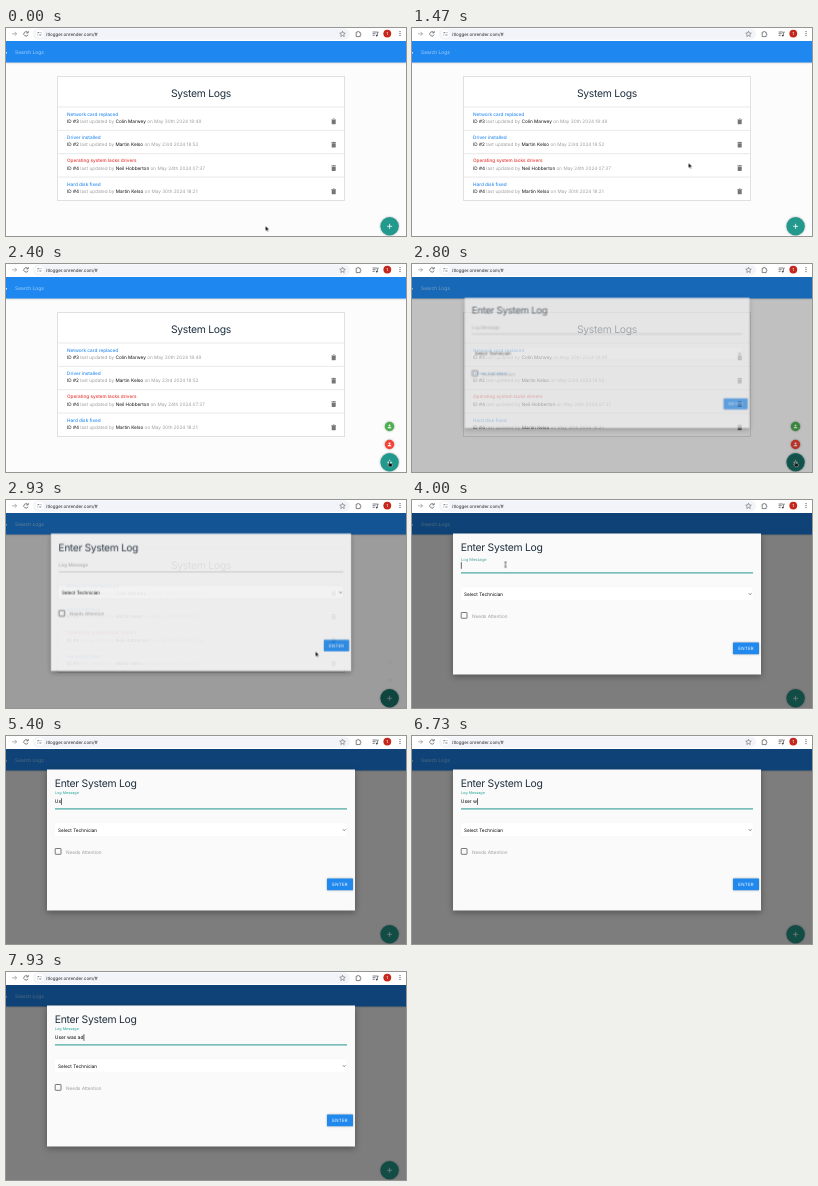
An HTML page for the animation above (8 s loop, 400 px wide and 208 px high).

```html
<!DOCTYPE html>
<html lang="en">
<head>
<meta charset="utf-8">
<title>System Logs</title>
<style>
  html, body { margin: 0; width: 100%; height: 100%; overflow: hidden; background: #fcfcfc; }
  svg { display: block; width: 100vw; height: 100vh; }
  text { font: 4.7px Inter, sans-serif; white-space: pre; text-rendering: geometricPrecision; }
  .h { font-size: 10.4px; letter-spacing: -.028em; fill: #20303f; }
  .muted { fill: #9e9e9e; }
  .input { font-size: 4.9px; }
  .mid { text-anchor: middle; }
  .pop { transform-box: fill-box; transform-origin: center; }
  .line { fill: none; stroke: #5f6368; stroke-width: .8; }
  .raised { filter: drop-shadow(0 .7px .8px rgba(0, 0, 0, .3)); }
  #sheet { filter: drop-shadow(0 2px 3px rgba(0, 0, 0, .35)); }
</style>
</head>
<body>
<svg viewBox="0 0 400 208" preserveAspectRatio="none">
  <defs>
    <g id="trash" fill="#757575">
      <path d="M-2.4-2.3h1.4l.4-.5h1.2l.4.5h1.4v.7h-4.8zM-2-1.2h4v3.6q0 .6-.6.6h-2.8q-.6 0-.6-.6z"/>
    </g>
    <g id="person" fill="#fff">
      <circle cy="-1" r="1"/>
      <path d="M-2 1.8q0-1.5 2-1.5t2 1.5z"/>
    </g>
  </defs>

  <g id="page">
    <rect width="400" height="208" fill="#fcfcfc"/>
    <rect class="raised" y="13" width="400" height="21.5" fill="#1e88f0"/>
    <rect y="24" width="1" height="1.6" fill="#cfe6fc"/>
    <text class="input" x="9" y="25.6" fill="#a5d0f9">Search Logs</text>
    <rect x="51.5" y="48.5" width="287" height="124" fill="#fff" stroke="#e0e0e0"/>
    <text class="h mid" x="195" y="69.4">System Logs</text>
    <g id="rows"></g>
    <g id="mini1" class="pop"><circle class="raised" cx="383.5" cy="162.5" r="4.7" fill="#4caf50"/><use href="#person" x="383.5" y="162.5"/></g>
    <g id="mini2" class="pop"><circle class="raised" cx="383.5" cy="180.5" r="4.7" fill="#f44336"/><use href="#person" x="383.5" y="180.5"/></g>
    <circle class="raised" cx="383.6" cy="198.3" r="9.2" fill="#22998c"/>
    <path d="M383.6 195.8v5M381.1 198.3h5" stroke="#fff" stroke-width=".8"/>
    <circle id="ripple" class="pop" cx="383.6" cy="198.3" r="9.2"/>
  </g>
  <rect id="shade" y="13" width="400" height="195"/>

  <g id="bar">
    <rect width="400" height="13" fill="#fff"/>
    <rect x="27" y=".5" width="317" height="11.2" rx="5.6" fill="#f2f4f9"/>
    <path class="line" stroke-opacity=".6" d="M6 5.8h4.6M8.6 3.8l2 2-2 2"/>
    <path class="line" d="M21.8 4.6a2.2 2.2 0 1 0 .3 2M22.2 3v1.9h-1.9"/>
    <circle cx="33.4" cy="5.8" r="4" fill="#fff"/>
    <path class="line" d="M31.4 4.7h2M34.6 4.7h.8M31.4 7h.8M33.4 7h2"/>
    <text x="40.3" y="7.5" style="font-size:4.5px" fill="#202124">itlogger.onrender.com/#</text>
    <path class="line" style="stroke-width:.6" d="M336.5 3.2l.8 1.8 2 .2-1.5 1.3.4 2-1.7-1-1.7 1 .4-2-1.5-1.3 2-.2z"/>
    <path class="line" d="M350.2 4.2h1.2a.8.8 0 0 1 1.6 0h1.2v1.4a.8.8 0 0 1 0 1.6v1.4h-4z"/>
    <path class="line" d="M366.6 4h4.4M366.6 5.7h3M366.6 7.4h2M371.4 7.8v-3.6h1.4"/>
    <circle cx="370.7" cy="7.6" r=".9" fill="#444"/>
    <circle cx="381.3" cy="5.6" r="3.9" fill="#c4281c"/>
    <text class="mid" x="381.3" y="7.2" fill="#fff">t</text>
    <g fill="#444"><circle cx="394" cy="3.6" r=".55"/><circle cx="394" cy="5.6" r=".55"/><circle cx="394" cy="7.6" r=".55"/></g>
  </g>

  <g id="modal" class="pop">
    <rect id="sheet" x="41" y="33.5" width="308" height="141" fill="#fafafa"/>
    <text class="h" x="48.8" y="51.3">Enter System Log</text>
    <text id="label">Log Message</text>
    <path d="M49 72.9h292" stroke="#9e9e9e" stroke-width=".5"/>
    <path id="focus" d="M49 72.9h292" stroke="#26a69a" stroke-width=".9"/>
    <text id="typed" class="input" x="48.8" y="67.4"></text>
    <rect id="caret" y="62.2" width=".6" height="6.6"/>
    <rect x="48.5" y="87" width="292.5" height="13.6" fill="#fff" stroke="#f3f3f3" stroke-width=".4"/>
    <text x="52" y="95.6">Select Technician</text>
    <path d="M336.9 93.3l1.3 1.3 1.3-1.3" fill="none" stroke="#222" stroke-width=".6"/>
    <rect x="49.2" y="112.5" width="5.8" height="5.8" rx=".4" fill="none" stroke="#5a5a5a" stroke-width=".8"/>
    <text class="muted" x="60" y="117.9">Needs Attention</text>
    <rect class="raised" x="321" y="142.5" width="26" height="11.8" rx=".6" fill="#2189ee"/>
    <text class="mid" x="334.1" y="150" fill="#fff" style="font-size:4.4px;letter-spacing:.3px">ENTER</text>
  </g>

  <g id="cursor">
    <path id="arrow" d="M0 0v4.9l1.2-1 .8 1.8.8-.4-.8-1.7h1.6z" stroke="#fff" stroke-width=".35"/>
    <path id="hand" d="M0 0q.6-.4 1 .3v2l2 .6q.5.2.4.9l-.5 2h-2.5l-1.8-2.4q0-.7.8-.4l.6.5z" fill="#111" stroke="#fff" stroke-width=".35"/>
    <path id="beam" d="M-1.1-2.6q1.1 0 1.1.7v4q0 .7-1.1.7M1.1-2.6q-1.1 0-1.1.7M0 2.1q0 .7 1.1.7" fill="none" stroke="#111" stroke-width=".6"/>
  </g>
</svg>

<script>
const LOOP = 8000;
const CUBIC = 'cubic-bezier(.215,.61,.355,1)', QUAD = 'cubic-bezier(.25,.46,.45,.94)';
const $ = id => document.getElementById(id);

const logs = [
  ['Network card replaced', 3, 'Colin Marwey', 'May 30th 2024 18:49'],
  ['Driver installed', 2, 'Martin Kelso', 'May 23rd 2024 18:52'],
  ['Operating system lacks drivers', 4, 'Neil Hobberton', 'May 24th 2024 07:37', true],
  ['Hard disk fixed', 4, 'Martin Kelso', 'May 30th 2024 18:21']
];
$('rows').innerHTML = logs.map(([title, id, name, date, urgent], i) => `
  <g transform="translate(0 ${i * 23.35})">
    <path d="M51 79h288" stroke="#e0e0e0" stroke-width=".7"/>
    <text x="61" y="87.8" font-weight="500" style="font-weight:500" fill="${urgent ? '#e53935' : '#2b8cf0'}">${title}</text>
    <text x="61" y="95" class="muted"><tspan fill="#111">ID #${id}</tspan> last updated by <tspan fill="#111">${name}</tspan> on ${date}</text>
    <use href="#trash" x="327.7" y="93.2"/>
  </g>`).join('');

// Each step: [time in ms, properties, easing to the next step]
const tracks = [];
function track(id, steps) {
  const all = [[0, steps[0][1]], ...steps, [LOOP, steps[steps.length - 1][1]]];
  const frames = all.map(([ms, props, easing = 'linear']) => ({ offset: ms / LOOP, easing, ...props }));
  const a = $(id).animate(frames, { duration: LOOP, iterations: Infinity });
  a.pause();
  tracks.push(a);
}
const show = (id, from, to) => track(id, [
  [0, { opacity: from ? 0 : 1 }, 'step-end'],
  [from, { opacity: 1 }, 'step-end'],
  [to, { opacity: 0 }]
]);
const at = (x, y, s = 1) => ({ transform: `translate(${x}px, ${y}px) scale(${s})` });

track('cursor', [
  [70, at(259.5, 198), 'ease-in-out'], [600, at(272, 152)],
  [800, at(272, 152), 'ease-in-out'], [1130, at(277, 137)],
  [1470, at(276.5, 135), 'ease-in-out'], [2070, at(380, 193)],
  [2400, at(383, 197)], [2820, at(383, 197)],
  [2930, at(309.5, 151.5), QUAD], [3780, at(93.5, 64.5)]
]);
track('arrow', [
  [0, { opacity: 1 }, 'step-end'], [2070, { opacity: 0 }, 'step-end'],
  [2860, { opacity: 1 }, 'step-end'], [3600, { opacity: 0 }]
]);
show('hand', 2070, 2860);
show('beam', 3600, 5270);

['mini2', 'mini1'].forEach((id, i) => track(id, [
  [2130 + i * 60, { opacity: 0, ...at(0, 12, .4) }, CUBIC],
  [2340 + i * 60, { opacity: 1, ...at(0, 0) }],
  [2830, { opacity: 1, ...at(0, 0) }, CUBIC],
  [2990, { opacity: 0, ...at(0, 0, .4) }]
]));
track('ripple', [
  [2620, { opacity: 0, ...at(0, 0, 0) }],
  [2630, { opacity: .3, ...at(0, 0, .1) }, CUBIC],
  [2880, { opacity: .3, ...at(0, 0) }],
  [3300, { opacity: 0, ...at(0, 0) }]
]);
track('shade', [[2650, { opacity: 0 }, QUAD], [3215, { opacity: .5 }]]);
track('modal', [
  [2649, { opacity: 0, ...at(0, -14, .8) }],
  [2650, { opacity: 0, ...at(0, -14, .8) }, CUBIC],
  [3215, { opacity: 1, ...at(0, 0) }]
]);

const FOCUS = 3900;
track('label', [
  [FOCUS, { fill: '#9e9e9e', ...at(49, 67.2) }, 'ease-out'],
  [FOCUS + 200, { fill: '#26a69a', ...at(49, 58.3, .8) }]
]);
track('focus', [[FOCUS, { opacity: 0 }], [FOCUS + 100, { opacity: 1 }]]);

const message = 'User was ad';
const keys = [5270, 5390, 5730, 5970, 6530, 6730, 6870, 7100, 7400, 7670, 7920];

function type(t) {
  const n = keys.filter(k => k <= t).length;
  const last = n ? keys[n - 1] : FOCUS;
  const typed = $('typed'), caret = $('caret');
  typed.textContent = message.slice(0, n);
  caret.setAttribute('x', 48.9 + (n ? typed.getComputedTextLength() : 0));
  caret.setAttribute('opacity', t >= FOCUS && (t - last) % 1060 < 540 ? 1 : 0);
}

let start;
function draw(now) {
  start ??= now;
  const t = (now - start) % LOOP;
  tracks.forEach(a => { a.currentTime = t; });
  type(t);
  requestAnimationFrame(draw);
}
requestAnimationFrame(draw);
</script>
</body>
</html>
```
